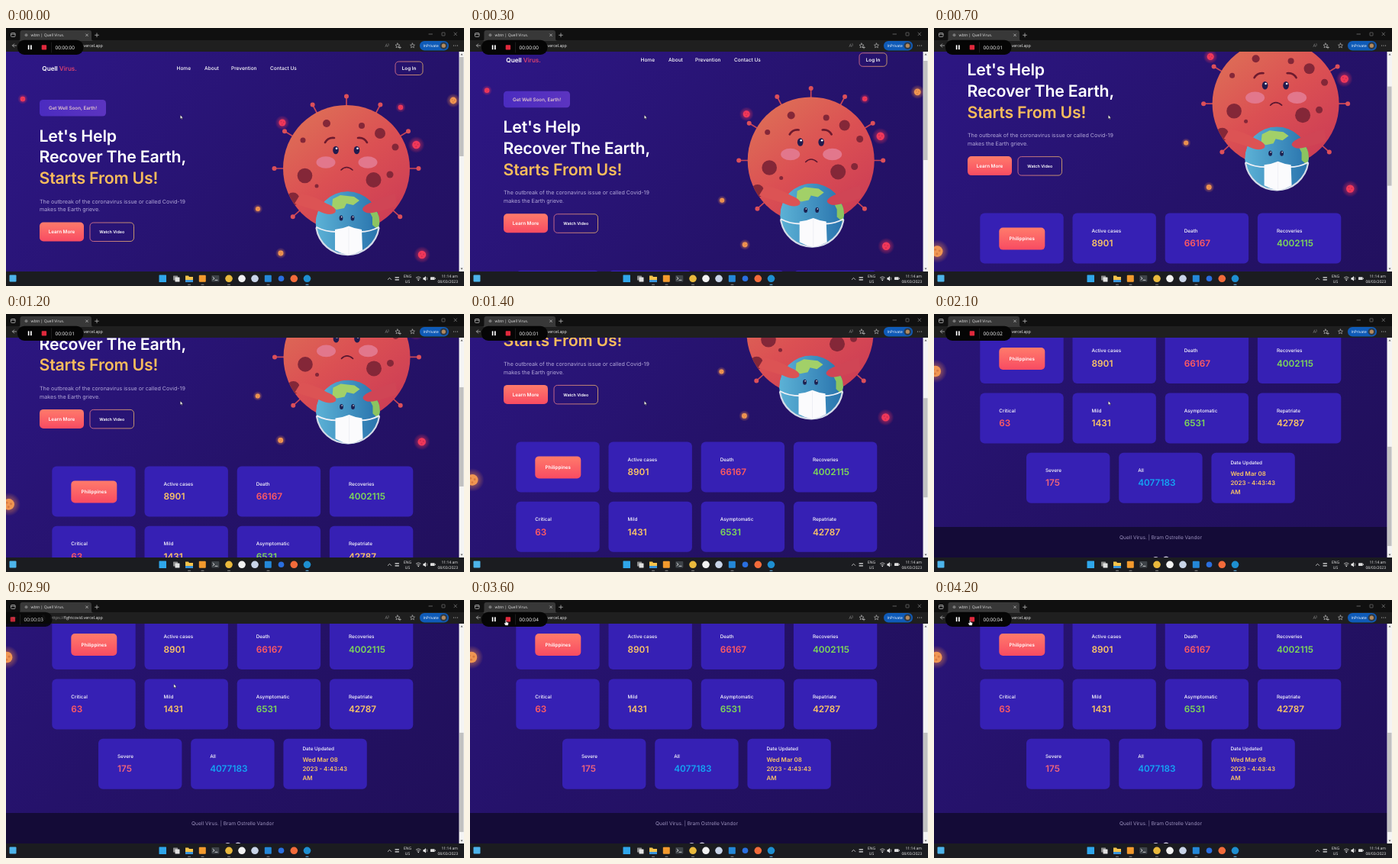
An HTML page for the animation above (4.3 s loop, 600 by 338 pixels).

```html
<!DOCTYPE html>
<html lang="en">
<head>
<meta charset="utf-8">
<title>Scrolling page</title>
<style>
  html, body { margin: 0; width: 100%; height: 100%; overflow: hidden; background: #1c1c1c; }
  svg { display: block; width: 600px; height: 338px; }
  text { font-family: Inter, "Open Sans", sans-serif; text-rendering: geometricPrecision; white-space: pre; }
  .ui { font-family: "Open Sans", "Noto Sans", sans-serif; }
</style>
</head>
<body>
<svg id="stage" viewBox="0 0 600 338">
  <defs>
    <linearGradient id="bg" x1="0" y1="0" x2="1" y2="1">
      <stop offset="0" stop-color="#2e1787"/><stop offset=".5" stop-color="#25126a"/><stop offset="1" stop-color="#200f58"/>
    </linearGradient>
    <linearGradient id="coral" x1="0" y1="0" x2="0" y2="1">
      <stop offset="0" stop-color="#ff7b6b"/><stop offset="1" stop-color="#f84b62"/>
    </linearGradient>
    <linearGradient id="edge" x1="0" y1="0" x2="1" y2="0">
      <stop offset="0" stop-color="#e8788c"/><stop offset="1" stop-color="#e8b46c"/>
    </linearGradient>
    <linearGradient id="badge" x1="0" y1="0" x2="1" y2="0">
      <stop offset="0" stop-color="#4b2cc0"/><stop offset="1" stop-color="#5c34c0"/>
    </linearGradient>
    <linearGradient id="skin" x1=".1" y1="0" x2=".85" y2="1">
      <stop offset="0" stop-color="#de7257"/><stop offset=".5" stop-color="#db5053"/><stop offset="1" stop-color="#cb3b55"/>
    </linearGradient>
    <linearGradient id="sea" x1="0" y1="0" x2="1" y2="0">
      <stop offset="0" stop-color="#5cb2d6"/><stop offset="1" stop-color="#2872ac"/>
    </linearGradient>
    <radialGradient id="red">
      <stop offset="0" stop-color="#f03458" stop-opacity=".8"/><stop offset="1" stop-color="#f03458" stop-opacity="0"/>
    </radialGradient>
    <radialGradient id="amber">
      <stop offset="0" stop-color="#f08a48" stop-opacity=".8"/><stop offset="1" stop-color="#f08a48" stop-opacity="0"/>
    </radialGradient>
    <clipPath id="view"><rect y="31" width="594" height="288"/></clipPath>
    <clipPath id="globe"><circle cx="447.5" cy="256" r="42"/></clipPath>
    <clipPath id="ball"><circle cx="446" cy="184" r="83"/></clipPath>
  </defs>
</svg>
<script>
const LOOP = 4300, STEP = 100, NOTCH = 43.2, END = 304;
const stage = document.getElementById('stage');

function add(parent, tag, attrs, content) {
  const node = document.createElementNS('http://www.w3.org/2000/svg', tag);
  for (const key in attrs) node.setAttribute(key, attrs[key]);
  if (content) node.textContent = content;
  return parent.appendChild(node);
}
const group = (p, attrs) => add(p, 'g', attrs);
const rect = (p, x, y, width, height, fill, rx = 0, more) => add(p, 'rect', { x, y, width, height, fill, rx, ...more });
const disc = (p, cx, cy, r, fill) => add(p, 'circle', { cx, cy, r, fill });
const oval = (p, cx, cy, rx, ry, fill) => add(p, 'ellipse', { cx, cy, rx, ry, fill });
const shape = (p, d, fill) => add(p, 'path', { d, fill });
const line = (p, d, stroke, width = .7) => add(p, 'path', {
  d, stroke, 'stroke-width': width, fill: 'none', 'stroke-linecap': 'round', 'stroke-linejoin': 'round' });
// y is the middle of the capitals
const label = (p, str, x, y, size, fill, weight = 400, more) => add(p, 'text', {
  x, y: y + size * .36, 'font-size': size, fill, 'font-weight': weight, ...more }, str);
const mid = { 'text-anchor': 'middle' };
const ui = { class: 'ui' };

// Page
const view = group(stage, { 'clip-path': 'url(#view)' });
const page = group(view);
rect(page, 0, 31, 594, 600, 'url(#bg)');

const logo = label(page, 'Quell ', 47.3, 53, 8.2, '#fff', 600);
add(logo, 'tspan', { fill: '#f0466c', 'font-weight': 500 }, 'Virus.');
[['Home', 223.5], ['About', 260], ['Prevention', 295], ['Contact Us', 346]]
  .forEach(([str, x]) => label(page, str, x, 52.5, 6.55, '#fff', 500));

function outlined(str, x, y, w, h, size) {
  rect(page, x, y, w, h, 'none', 4.5, { stroke: 'url(#edge)', 'stroke-width': .8 });
  label(page, str, x + w / 2, y + h / 2, size, '#fff', 600, mid);
}
function filled(str, x, y, w, h) {
  rect(page, x, y, w, h, 'url(#coral)', 5);
  label(page, str, x + w / 2, y + h / 2, 6.3, '#fff', 600, mid);
}
outlined('Log In', 510, 44, 36, 17.5, 6.3);
rect(page, 44, 94, 87, 21.5, 'url(#badge)', 4.5);
label(page, 'Get Well Soon, Earth!', 87.5, 104.8, 6.25, '#f3d8cc', 500, mid);
[["Let's Help", '#fff'], ['Recover The Earth,', '#fff'], ['Starts From Us!', '#f8bc5c']]
  .forEach(([str, fill], i) => label(page, str, 43.5, 141 + i * 27.7, 21.3, fill, 600, { 'letter-spacing': -.2 }));
['The outbreak of the coronavirus issue or called Covid-19', 'makes the Earth grieve.']
  .forEach((str, i) => label(page, str, 44, 227 + i * 10.6, 7.13, '#b4a9da'));
filled('Learn More', 44, 254.5, 58, 25);
outlined('Watch Video', 110, 255, 57.5, 24.5, 5.4);

// Virus holding the Earth
const hero = group(page);
const polar = (deg, r) => {
  const a = deg * Math.PI / 180;
  return [446 + r * Math.sin(a), 184 - r * Math.cos(a)];
};
[0, 28, -28, 59, -59, 90, -90, 132, -132].forEach(deg => {
  line(hero, `M${polar(deg, 80)}L${polar(deg, 94)}`, '#c84657', 1.7);
  disc(hero, ...polar(deg, 94.5), 3, '#dc4f59');
});
disc(hero, 446, 184, 83, 'url(#skin)');
const spots = group(hero, { 'clip-path': 'url(#ball)' });
[[420, 125, 5], [466, 128, 4], [490, 138, 7], [510, 156, 4.5], [389, 147, 3.5], [391.5, 193.5, 9.8],
 [481.5, 199, 10], [503, 192, 4.5], [407, 207, 2.5], [376, 224, 8.5]]
  .forEach(([x, y, r]) => disc(spots, x, y, r, '#842738'));
[419, 474].forEach(x => oval(hero, x, 176, 12.5, 7.8, '#e2778c'));
[432, 459.5].forEach(x => {
  oval(hero, x, 160, 3.8, 5.2, '#211b4e');
  disc(hero, x + 1, 157.8, 1.3, '#fff');
});
line(hero, 'M418 150Q422 143 430 144', '#6d1a2e', 2.6);
line(hero, 'M461 144Q469 143 473 150', '#6d1a2e', 2.6);
line(hero, 'M439 186Q446 179 454 186', '#5a1730', 1.6);

const globe = group(hero, { 'clip-path': 'url(#globe)' });
disc(globe, 447.5, 256, 42, 'url(#sea)');
shape(globe, 'M428 224L438 219L456 221L463 226L455 232L446 230L443 236L433 238L427 235Z', '#a2d068');
shape(globe, 'M474 236L482 234L491 250L487 264L480 258L480 248Z', '#8cc460');
line(hero, 'M406.5 262A41.5 41.5 0 0 0 488.5 262', '#d5dbe8', 2.2);
line(hero, 'M407 261Q418 267 433 267M488 261Q477 267 464 267', '#eef0f6', 1.8);
shape(hero, 'M386 217Q404 220 420 230Q435 236 431 242Q424 247 410 240Q396 236 378 230Z', '#dc5354');
shape(hero, 'M510 217Q496 220 483 227Q467 232 467 238Q471 245 485 241Q499 238 512 233Z', '#d04555');
[439, 454].forEach(x => {
  oval(hero, x, 249, 2.4, 3.5, '#1c2150');
  disc(hero, x + .6, 247.6, .8, '#fff');
});
shape(hero, 'M431 264Q441 263 449 259.5Q457 263 466 264L467 291Q458 296 449 297.5Q440 296 431 291Z', '#fbfbfd');
line(hero, 'M449 261V296', '#e6e8f0', .6);

// Cards
const Y = '#fbc566', R = '#ff5a62', G = '#7fd858';
function card(x, y, title, value, fill) {
  rect(page, x, y, 109.4, 66, '#3620b4', 6);
  if (!title) return filled('Philippines', x + 25, y + 19, 60, 29);
  const rows = value.split('\n'), long = rows.length > 1;
  label(page, title, x + 25, y + (long ? 13 : 23), 6.35, '#fff', 500);
  rows.forEach((str, i) => label(page, str, x + 25, y + (long ? 27 + i * 12.2 : 39.5), long ? 7.9 : 11.8, fill, 600));
}
[
  [60.3, 329, [[], ['Active cases', '8901', Y], ['Death', '66167', R], ['Recoveries', '4002115', G]]],
  [60.3, 407.4, [['Critical', '63', R], ['Mild', '1431', Y], ['Asymptomatic', '6531', G], ['Repatriate', '42787', Y]]],
  [121, 485.7, [['Severe', '175', '#ee647c'], ['All', '4077183', '#14a4f4'],
    ['Date Updated', 'Wed Mar 08\n2023 - 4:43:43\nAM', Y]]]
].forEach(([x, y, cells]) => cells.forEach((cell, i) => card(x + i * 121.2, y, ...cell)));

rect(page, 0, 583, 594, 48, '#140b37');
label(page, 'Quell Virus. | Bram Ostrelle Vandor', 297, 597, 6.6, '#9a90bd', 400, mid);
disc(page, 290.5, 626, 4, '#cfcbe0');
disc(page, 304, 625.5, 4, '#cfcbe0');

// Floating viruses: x, y, radius, colour
const floaters = [
  [22, 93, 3.2, 'red'], [362, 124, 4.5, 'red'], [517, 104, 3.2, 'red'], [537.5, 153, 5.2, 'red'], [545, 297, 5.2, 'red'],
  [586, 95, 4.4, 'amber'], [330, 237, 3, 'amber'], [360, 295, 3.4, 'amber'], [4, 379, 7.3, 'amber']
].map(([x, y, r, hue]) => {
  const g = group(page);
  const core = hue === 'red' ? '#f0385a' : '#f09652', spot = hue === 'red' ? '#d42c52' : '#d97a42';
  disc(g, x, y, r * 2.1, `url(#${hue})`);
  disc(g, x, y, r, core);
  [[-.35, -.3], [.4, -.1], [-.05, .45]].forEach(([a, b]) => disc(g, x + a * r, y + b * r, r * .2, spot));
  return { g, reach: x < 10 ? 1.6 : 1.2 };
});

// Scrollbar
rect(stage, 593.5, 31, 6.5, 288, '#f4f4f4');
shape(stage, 'M595.5 35.5L597 33.5L598.5 35.5Z', '#555');
shape(stage, 'M595.5 314.5L597 316.5L598.5 314.5Z', '#555');
const thumb = rect(stage, 594.1, 38, 5.4, 130, '#c1c1c1');

// Browser frame
const pale = '#c9c9c9', dim = '#858585';
rect(stage, 0, 0, 600, 17, '#101010');
rect(stage, 0, 16, 600, 15, '#1f1f1f');
shape(stage, 'M16 17Q18.5 17 18.5 14V6Q18.5 3 21.5 3H109Q112 3 112 6V14Q112 17 115 17Z', '#383838');
rect(stage, 6.5, 6.5, 5.5, 5, 'none', 1, { stroke: pale, 'stroke-width': .7 });
line(stage, 'M6.5 8.2H12', pale);
disc(stage, 26.5, 9.3, 2, '#777');
label(stage, 'wbtn | Quell Virus.', 32.5, 9.3, 5, '#e6e6e6', 400, ui);
line(stage, 'M104.6 7.9L107.4 10.7M107.4 7.9L104.6 10.7', pale);
line(stage, 'M116.6 9.3H121.4M119 6.9V11.7', pale);
line(stage, 'M554 8H558.5M587 6L590.5 9.8M590.5 6L587 9.8', dim);
rect(stage, 571, 6, 4, 4, 'none', .4, { stroke: dim, 'stroke-width': .6 });
line(stage, 'M13.5 23H8.5L10.7 20.8M8.5 23L10.7 25.2', pale);
line(stage, 'M31.5 21.5A2.4 2.4 0 1 0 32 23.6M31.7 20V21.7H30', dim);
rect(stage, 46.8, 22.4, 4, 3, 'none', .5, { stroke: dim, 'stroke-width': .7 });
line(stage, 'M47.7 22.2V21A1.1 1.1 0 0 1 49.9 21V22.2', dim);
const url = label(stage, 'https://', 58, 23, 5.3, '#9a9a9a', 400, ui);
add(url, 'tspan', { fill: '#efefef' }, 'fightcovid.vercel.app');
label(stage, 'A', 496.5, 23, 6, dim, 400, ui);
line(stage, 'M501 20.5Q502 22 501 23.5', dim, .6);
const star = (x, y) => line(stage, `M${x} ${y - 3}l.9 2 2.1.2-1.6 1.5.5 2.1-1.9-1.1-1.9 1.1.5-2.1-1.6-1.5 2.1-.2z`, pale, .6);
star(513, 23);
star(532.5, 23);
line(stage, 'M514.5 25.5H517.5M516 24V27', pale, .6);
rect(stage, 542, 17, 38, 12.5, '#0f5bb8', 6.2);
label(stage, 'InPrivate', 546.5, 23.2, 4.9, '#fff', 400, ui);
disc(stage, 573.3, 23.2, 4.8, '#2e3a48');
disc(stage, 573.3, 23.2, 2.6, '#b58a5c');
[586.5, 589, 591.5].forEach(x => disc(stage, x, 23, .6, pale));

// Taskbar
rect(stage, 0, 319, 600, 19, '#1b1c20');
rect(stage, 4.5, 323.5, 9, 9, '#4db4ea', 1);
rect(stage, 200.5, 323.5, 9.5, 9.5, '#2fa6ea', .6);
rect(stage, 219, 324.5, 6, 6, '#8a8a8a', .6);
rect(stage, 221.5, 326.5, 6, 6, '#e0e0e0', .6);
shape(stage, 'M235 324.5H239L240 326H245V333H235Z', '#f5c34b');
rect(stage, 235, 330, 10, 3, '#3a95da');
rect(stage, 252.8, 323.8, 9, 9, '#f39a2d', 1);
rect(stage, 269.3, 324, 10, 8.6, '#3e4348', 1);
line(stage, 'M271 326.3L273 328L271 329.7M274 330.3H277', '#fff', .7);
[[292, '#e9b93c'], [309, '#f2f2f2'], [326, '#c8d4e8'], [377.3, '#f26b3a'], [394.5, '#1e8fd0']]
  .forEach(([x, fill]) => disc(stage, x, 328.3, 4.8, fill));
rect(stage, 338.8, 323.8, 9, 9, '#2488d8', 1);
disc(stage, 360.5, 328.3, 3.8, '#2a6fe0');
[240, 257.5, 292, 343.5, 394.5].forEach((x, i) => rect(stage, x - 2, 335.8, 4, 1, i === 4 ? '#6cc0f5' : '#8d8d8d', .5));
line(stage, 'M500.3 329.5L502.5 327.3L504.7 329.5', '#ddd', .8);
line(stage, 'M510 326.8H514.5M510 329.8H514.5', '#e5e5e5', 1.2);
label(stage, 'ENG', 526, 325.3, 5, '#f2f2f2', 400, { ...ui, ...mid });
label(stage, 'US', 526, 331.8, 5, '#f2f2f2', 400, { ...ui, ...mid });
line(stage, 'M537.3 327Q540.3 324.5 543.3 327M538.6 328.7Q540.3 327.3 542 328.7', '#eee', .7);
disc(stage, 540.3, 330.4, .8, '#eee');
shape(stage, 'M546.5 327H548L550 325V331.5L548 329.7H546.5Z', '#eee');
line(stage, 'M551.3 326.8Q552.3 328.3 551.3 329.8', '#eee', .6);
rect(stage, 556, 326.3, 5.6, 3.8, '#ddd', .7);
rect(stage, 562, 327.4, .8, 1.6, '#ddd');
label(stage, '11:14 am', 592, 325.3, 5, '#f2f2f2', 400, { ...ui, 'text-anchor': 'end' });
label(stage, '08/03/2023', 592, 331.8, 5, '#f2f2f2', 400, { ...ui, 'text-anchor': 'end' });

// Screen recorder
const bar = group(stage);
rect(bar, 15, 15.8, 86.5, 19.2, '#050505', 9);
rect(bar, 28.8, 22.4, 1.7, 5.8, '#fff');
rect(bar, 32, 22.4, 1.7, 5.8, '#fff');
rect(bar, 46.7, 22.2, 6.4, 6.4, '#e0293c', .8);
line(bar, 'M59.5 19V32', '#2c2c2c', .6);
const timer = label(bar, '00:00:00', 64.5, 25.3, 6.4, '#fff', 400, ui);

// Pointers, tip at 0,0
const arrow = group(stage), hand = group(stage);
add(arrow, 'path', { d: 'M0 0V5L1.2 4L2 5.7L2.8 5.3L2 3.7H3.6Z', fill: '#fff', stroke: '#111', 'stroke-width': .4 });
add(hand, 'path', { d: 'M-.6 .3Q0-.6.6.3V2.6L3 3.2Q3.6 3.5 3.4 4.4L2.9 7H-.6L-2.3 4.4Q-2 3.4-.6 4Z',
  fill: '#fff', stroke: '#111', 'stroke-width': .4 });

// Keyframes: time, then values
const heroKeys = [[0, 0, 0], [700, 1.6, 1.6], [1200, .5, 2], [1700, -2, 1.6], [4300, -2, 1.6]];
const pointerKeys = [[2800, 228.3, 114], [2900, 219.8, 110], [3000, 96, 52], [3100, 62, 33], [3300, 47, 26.3], [4300, 47, 26.3]];
const barKeys = [[2700, 0], [2900, -41], [3050, -86], [3150, -86], [3400, 0]];
const wheel = [250, 450, 950, 1300, 1420, 1540, 1780, 1850];

function at(keys, t) {
  if (t <= keys[0][0]) return keys[0].slice(1);
  const i = keys.findIndex(k => k[0] > t);
  if (i < 0) return keys[keys.length - 1].slice(1);
  const a = keys[i - 1], b = keys[i], f = (t - a[0]) / (b[0] - a[0]);
  return a.slice(1).map((v, n) => v + (b[n + 1] - v) * f);
}
const ease = p => { p = Math.min(1, Math.max(0, p)); return p * p * (3 - 2 * p); };
const move = (node, x, y) => node.setAttribute('transform', `translate(${x.toFixed(2)} ${y.toFixed(2)})`);

function draw(t) {
  const scroll = Math.min(END, wheel.reduce((sum, start) => sum + NOTCH * ease((t - start) / 150), 0));
  move(page, 0, -scroll);
  thumb.setAttribute('y', 38 + scroll * .447);
  move(hero, ...at(heroKeys, t));
  const drift = Math.cos((t - 500) / 4600 * 2 * Math.PI) - .8;
  floaters.forEach(f => move(f.g, f.reach * drift, 0));

  const [slide] = at(barKeys, t);
  move(bar, slide, 0);
  bar.setAttribute('opacity', 1 + slide / 250);
  timer.textContent = '00:00:0' + Math.floor((t + 500) / 1000);

  const [x, y] = at(pointerKeys, t), over = t >= 3300;
  move(arrow, x, y);
  move(hand, x, y);
  arrow.setAttribute('visibility', over ? 'hidden' : 'visible');
  hand.setAttribute('visibility', over ? 'visible' : 'hidden');
}

const start = performance.now();
function tick() {
  const t = (performance.now() - start) % LOOP;
  draw(Math.floor(t / STEP) * STEP);
  requestAnimationFrame(tick);
}
tick();
</script>
</body>
</html>
```
